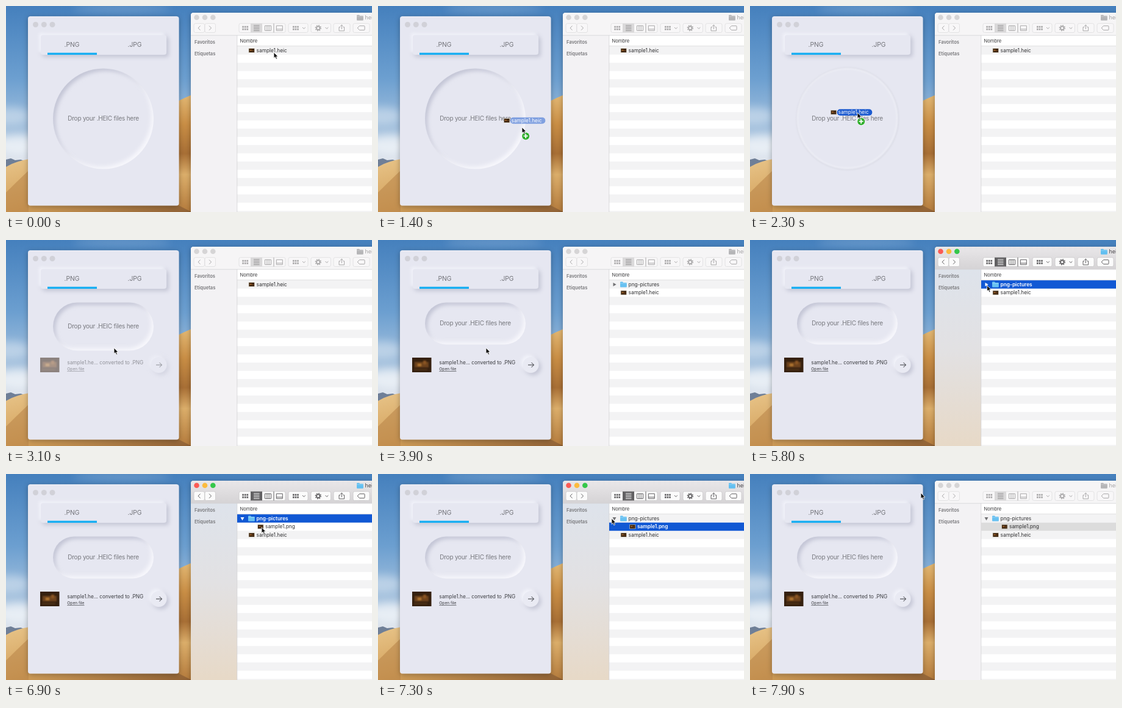
Recreate the animation shown at these times as an HTML page. Size 600 by 338 pixels, loop 8 s.

```html
<!DOCTYPE html>
<html lang="es">
<head>
<meta charset="utf-8">
<title>HEIC converter</title>
<style>
html, body { margin: 0; width: 100%; height: 100%; overflow: hidden; }
svg {
  display: block; width: 100vw; height: 100vh;
  font-family: Inter, "Open Sans", sans-serif;
  --ico: #a9a8a9; --line: #dedddf; --btn: #f8f7f8; --pick: #dad9da; --pickIco: #8f8e8f;
  --red: #d6d5d6; --amber: #d6d5d6; --green: #d6d5d6; --folder: #b5b5b7; --title: #a5a4a5;
  --bar: #f6f5f6; --mark: #dcdcdc;
}
svg.on {
  --ico: #626163; --line: #c9c8ca; --btn: #fbfbfb; --pick: #626163; --pickIco: #fff;
  --red: #fb5b55; --amber: #fcbb3e; --green: #35c74a; --folder: #62bff0; --title: #49484a;
  --bar: url(#barFill); --mark: #1158d4;
}
.ico { fill: none; stroke: var(--ico); stroke-width: 1; }
.ico .solid { fill: var(--ico); stroke: none; }
.btn { fill: var(--btn); stroke: var(--line); stroke-width: .8; }
.row text { fill: #303032; font-size: 8.3px; }
.row .tri { fill: #737375; }
.on .sel text { fill: #fff; font-weight: 600; }
.on .sel .tri { fill: #fff; }
.glass { opacity: 0; }
.on .glass { opacity: 1; }
</style>
</head>
<body>
<svg id="stage" viewBox="0 0 600 338" preserveAspectRatio="none">
  <defs>
    <linearGradient id="sky" x2="0" y2="1">
      <stop offset="0" stop-color="#4580bd"/><stop offset=".35" stop-color="#6c9fd0"/>
      <stop offset=".6" stop-color="#a6c2de"/><stop offset=".76" stop-color="#e3e7ee"/>
    </linearGradient>
    <linearGradient id="sand" x2="0" y2="1">
      <stop offset="0" stop-color="#e3b873"/><stop offset=".25" stop-color="#c98e45"/>
      <stop offset=".5" stop-color="#a86f35"/><stop offset=".68" stop-color="#dcae6a"/>
      <stop offset="1" stop-color="#b47b3c"/>
    </linearGradient>
    <linearGradient id="dune" x2="1" y2="1">
      <stop offset="0" stop-color="#e8c58a"/><stop offset=".5" stop-color="#d3a05a"/>
      <stop offset="1" stop-color="#8f6034"/>
    </linearGradient>
    <linearGradient id="barFill" x2="0" y2="1">
      <stop offset="0" stop-color="#e9e7e9"/><stop offset="1" stop-color="#d5d3d5"/>
    </linearGradient>
    <linearGradient id="glassFill" x2="0" y2="1">
      <stop offset="0" stop-color="#dee3eb"/><stop offset=".45" stop-color="#e2e1e3"/>
      <stop offset="1" stop-color="#e7d9c7"/>
    </linearGradient>
    <filter id="soft" x="-30%" y="-30%" width="160%" height="160%"><feGaussianBlur stdDeviation="3"/></filter>
    <filter id="haze" x="-50%" y="-50%" width="200%" height="200%"><feGaussianBlur stdDeviation="7"/></filter>
    <filter id="fine"><feGaussianBlur stdDeviation="1"/></filter>
    <filter id="raised" x="-50%" y="-50%" width="200%" height="200%">
      <feDropShadow dx="-3.5" dy="-3.5" stdDeviation="2.5" flood-color="#f2f3fa"/>
      <feDropShadow dx="4" dy="4" stdDeviation="3" flood-color="#c6c8d7"/>
    </filter>
    <filter id="window" x="-10%" y="-10%" width="120%" height="120%">
      <feDropShadow dx="0" dy="2" stdDeviation="4" flood-color="#000" flood-opacity=".3"/>
    </filter>
    <clipPath id="wellClip"><rect class="well" data-grow="0"/></clipPath>
  </defs>
  <g id="scene"></g>
</svg>
<script>
const LOOP = 8000, STEP = 100;
const ROW_TOP = 66.2, ROW_H = 13.5;
const $ = id => document.getElementById(id);

const text = (x, y, size, fill, str, more = '') =>
  `<text x="${x}" y="${y}" font-size="${size}" fill="${fill}" ${more}>${str}</text>`;
const box = (x, y, w, h, fill, more = '') =>
  `<rect x="${x}" y="${y}" width="${w}" height="${h}" fill="${fill}" ${more}/>`;
const dot = (x, y, r, fill) => `<circle cx="${x}" cy="${y}" r="${r}" fill="${fill}"/>`;
const path = (d, more = '') => `<path d="${d}" ${more}/>`;
const repeat = (n, fn) => Array.from({ length: n }, (_, i) => fn(i)).join('');
const mid = 'text-anchor="middle"';

const picture = (x, y) => box(x, y, 10, 7.4, '#c9bfae') + box(x + .7, y + .7, 8.6, 6, '#39230f') +
  box(x + 2, y + 2.4, 3, 2, '#a0622a') + box(x + 5.6, y + 3.2, 2.6, 1.6, '#6e421c');
const folder = (x, y, fill) =>
  path(`M${x} ${y + 1}q0-1 1-1h3l1.2 1.3h4.6q1 0 1 1v5.7q0 1-1 1h-8.8q-1 0-1-1z`, `fill="${fill}"`) +
  path(`M${x} ${y + 2.6}h10.8`, 'stroke="#fff" stroke-opacity=".4" stroke-width=".7"');

function desktop() {
  return box(0, 0, 600, 338, 'url(#sky)') +
    `<g filter="url(#haze)" fill="#fff"><ellipse cx="8" cy="180" rx="30" ry="14" opacity=".35"/>
      <ellipse cx="20" cy="228" rx="36" ry="16" opacity=".6"/>
      <ellipse cx="190" cy="4" rx="80" ry="7" opacity=".18"/></g>` +
    path('M0 252l8-2 7 3 9-1 12 4v12H0z', 'fill="#6f7f97"') +
    path('M230 186Q270 160 304 146V338H230z', 'fill="url(#sand)"') +
    path('M0 264Q18 253 46 250Q160 262 304 338H0z', 'fill="url(#dune)"') +
    path('M0 306Q20 286 37 270V338H0z', 'fill="#b98448" opacity=".55"');
}

function converter() {
  const ring = (grow, color, shift) =>
    `<rect class="well" data-grow="${grow}" fill="none" stroke="${color}" stroke-width="20"
      filter="url(#soft)" transform="translate(${shift} ${shift})"/>`;
  return box(36, 17, 247.5, 310.5, '#e6e7f1', 'rx="4" filter="url(#window)"') +
    path('M39 17.4H280', 'stroke="#f5f5fa" stroke-width=".8"') +
    [48.5, 62.3, 76].map(x => dot(x, 30.5, 4.5, '#d1d1d8')).join('') +
    box(57, 47.5, 206, 32.5, '#e6e7f1', 'rx="4" filter="url(#raised)"') +
    text(108, 67, 10.3, '#727379', '.PNG', mid) + text(211, 67, 10.3, '#727379', '.JPG', mid) +
    box(68, 76.7, 81, 3.4, '#17aef2') +
    `<g id="hover"><circle cx="160" cy="185" r="83.5" fill="none" stroke="#dadbe5" stroke-width="2" filter="url(#fine)"/>
      <circle cx="159.4" cy="184.4" r="81.5" fill="none" stroke="#eeeff6" stroke-width="2" filter="url(#fine)"/></g>` +
    `<g id="inset" clip-path="url(#wellClip)">${ring(10, '#c3c5d5', 4)}${ring(10, '#f7f7fc', -4)}</g>` +
    text(159.6, 0, 10, '#77787e', 'Drop your .HEIC files here', `id="hint" ${mid} letter-spacing="-.22"`) +
    `<g id="result">${box(56, 193, 31.5, 24, '#35200f')}
      <g filter="url(#fine)">${box(60, 200, 23, 9, '#6d421a')}${box(65, 203, 6, 4, '#b0752e')}
      ${box(74, 198, 5, 6, '#8a5520')}${box(59, 211, 22, 3, '#4c2e13')}</g>` +
    text(100.3, 203.6, 8.3, '#3c3d42', 'sample1.he... converted to .PNG') +
    text(100.3, 214, 6.6, '#3c3d42', 'Open file', 'text-decoration="underline"') +
    `<circle cx="250.5" cy="205" r="13" fill="#e9eaf3" filter="url(#raised)"/>` +
    path('M246 205h9.5m-4-4l4 4-4 4', 'fill="none" stroke="#333438" stroke-width="1"') + '</g>';
}

function toolbar() {
  const btn = (x, w) => `<rect class="btn" x="${x}" y="28.7" width="${w}" height="14.8" rx="2.5"/>`;
  const chevron = x => path(`M${x} 35l2.4 2.4 2.4-2.4`);
  const cells = (x, y, n, step) => repeat(n * 2, i =>
    `<rect class="solid" x="${x + i % n * step}" y="${y + (i / n | 0) * 4}" width="2.6" height="2.8"/>`);
  return [308, 326].map(x => btn(x, 17.5)).join('') + btn(382, 76) +
    `<rect x="401" y="28.7" width="19" height="14.8" fill="var(--pick)"/>` +
    [[463, 32], [500, 32.5], [537, 27], [569, 27]].map(b => btn(...b)).join('') +
    `<g class="ico">` +
    path('M318.5 32.5l-3.5 3.6 3.5 3.6M333 32.5l3.5 3.6-3.5 3.6') +
    cells(387.3, 32.8, 3, 3.6) +
    path('M406 32h9.5m-9.5 2.8h9.5m-9.5 2.8h9.5m-9.5 2.8h9.5', 'style="stroke:var(--pickIco)"') +
    path('M424.5 32.3h10v8h-10zM427.9 32v8.5M431.2 32v8.5M443.3 32.3h10v8h-10zM443.3 38h10M439 28.7v14.8') +
    cells(470, 32.8, 3, 3.6) + chevron(486) + chevron(523.5) +
    `<circle cx="511.8" cy="36.2" r="2.8" stroke-width="1.8"/>
     <circle cx="511.8" cy="36.2" r="4.5" stroke-width="1.5" stroke-dasharray="1.7 1.83"/>` +
    path('M548 34.6h-2v6.2h8.6v-6.2h-2M550.3 38v-6.8m-2.2 2l2.2-2.2 2.2 2.2') +
    path('M579.5 32.6h7.5q1 0 1 1v5q0 1-1 1h-7.5l-3.3-3.5z') + '</g>';
}

function browser() {
  const rowText = (x, str) => text(x, 9.6, 8.3, '', str);
  return box(303, 11, 310, 340, '#f6f5f6', 'rx="4.5" filter="url(#window)"') +
    path('M303 48V15.5q0-4.5 4.5-4.5H600V48z', 'style="fill:var(--bar)"') +
    box(303, 48, 76, 290, '#f3f2f4') + box(303, 48, 76, 290, 'url(#glassFill)', 'class="glass"') +
    [312.5, 326, 339.3].map((x, i) => dot(x, 18.8, 4.3, `var(--${['red', 'amber', 'green'][i]})`)).join('') +
    folder(575, 14.8, 'var(--folder)') + text(588.5, 22.3, 9, 'var(--title)', 'heic') +
    toolbar() +
    text(309, 62.3, 7.6, '#77777a', 'Favoritos', 'font-weight="600"') +
    text(309, 81.3, 7.6, '#77777a', 'Etiquetas', 'font-weight="600"') +
    box(379, 48, 221, 290, '#fff') +
    repeat(11, i => box(379, ROW_TOP + i * 2 * ROW_H, 221, ROW_H, '#f3f3f4')) +
    text(383.5, 59.8, 7.6, '#3b3b3d', 'Nombre') +
    path('M303 48.2H600M379 65.7H600M378.8 48V338', 'stroke="#d5d4d6" stroke-width=".8"') +
    box(379, 0, 221, ROW_H, 'var(--mark)', 'id="mark"') +
    `<g id="dirRow" class="row"><g id="tri">${path('M-2-3L3.2 0L-2 3z', 'class="tri"')}</g>
      ${folder(397, 2.4, '#68c1f1')}${rowText(410.6, 'png-pictures')}</g>
    <g id="pngRow" class="row">${picture(412.3, 3.1)}${rowText(425, 'sample1.png')}</g>
    <g id="heicRow" class="row">${picture(397.7, 3.1)}${rowText(410.6, 'sample1.heic')}</g>`;
}

function pointer() {
  return `<g id="drag">${picture(-12.4, -3.7)}
      <rect id="pill" x="-1.7" y="-5.2" width="57.5" height="10.4" rx="5" fill="#1c5bd0"/>
      ${text(0, 2.9, 8.3, '#fff', 'sample1.heic')}</g>
    <g id="cursor"><g id="plus">${dot(6.2, 14.4, 6.6, '#fff')}${dot(6.2, 14.4, 6, '#2fae2c')}
      ${path('M6.2 10.9v7M2.7 14.4h7', 'stroke="#fff" stroke-width="1.8"')}</g>
      ${path('M0 0V9.6L2.2 7.6L3.8 11.2L5.5 10.4L4 7H7z',
        'fill="#111" stroke="#fff" stroke-width=".8" stroke-linejoin="round"')}</g>`;
}

$('scene').innerHTML = desktop() + converter() + browser() + pointer();
const wells = document.querySelectorAll('.well');

const clamp = v => Math.min(1, Math.max(0, v));
const smooth = v => v * v * (3 - 2 * v);
const ramp = (t, from, to) => smooth(clamp((t - from) / (to - from)));
const mix = (a, b, k) => a + (b - a) * k;

// time, x, y, eased arrival
const TRACK = [
  [0, 439, 76], [400, 439, 76], [1300, 250, 188.5, true], [1400, 236, 199], [1500, 227, 202],
  [2200, 176, 175, true], [2300, 176, 175], [2500, 177, 177], [4400, 177, 177],
  [5400, 388.5, 74.5, true], [6200, 388.5, 74.5], [6700, 419, 87.5, true], [7100, 419, 87.5],
  [7700, 280, 31, true], [LOOP, 280, 31]
];
function cursorAt(t) {
  const i = Math.max(1, TRACK.findIndex(k => k[0] >= t));
  const [a, b] = [TRACK[i - 1], TRACK[i]];
  const lin = clamp((t - a[0]) / (b[0] - a[0]));
  const k = b[3] ? smooth(lin) : lin;
  return [mix(a[1], b[1], k), mix(a[2], b[2], k)];
}

const show = (id, on) => { $(id).style.display = on ? '' : 'none'; };
const move = (id, x, y, more = '') => $(id).setAttribute('transform', `translate(${x} ${y})${more}`);
const fade = (id, v) => { $(id).style.opacity = v; };
const rowY = i => ROW_TOP + i * ROW_H;

function sizeWell(height) {
  for (const el of wells) {
    const g = +el.dataset.grow;
    const attrs = { x: 77 - g, y: 102.5 - g, width: 165 + 2 * g, height: height + 2 * g, rx: height / 2 + g };
    for (const name in attrs) el.setAttribute(name, attrs[name]);
  }
}

function draw(t) {
  const shrink = ramp(t, 2700, 3200);
  const height = mix(165, 69, shrink);
  const hover = ramp(t, 1400, 1900) * (1 - ramp(t, 2500, 2800));
  sizeWell(height);
  fade('inset', 1 - hover);
  fade('hover', hover);
  $('hint').setAttribute('y', 102.5 + height / 2 + 3.4);
  fade('result', ramp(t, 2900, 3300));

  const active = t >= 5600 && t < 7700;
  const listed = t >= 3300, open = t >= 6100, pngPicked = t >= 7000;
  $('stage').classList.toggle('on', active);
  show('dirRow', listed);
  show('pngRow', open);
  show('mark', t >= 5600);
  $('mark').setAttribute('y', rowY(pngPicked ? 1 : 0));
  $('dirRow').classList.toggle('sel', !pngPicked);
  $('pngRow').classList.toggle('sel', pngPicked);
  move('dirRow', 0, rowY(0));
  move('pngRow', 0, rowY(1));
  move('heicRow', 0, rowY(listed + open));
  move('tri', 387.5, 6.8, open ? ' rotate(90)' : '');

  const [x, y] = cursorAt(t);
  const [lagX, lagY] = cursorAt(Math.max(0, t - 100));
  move('cursor', x, y);
  move('drag', lagX - 31.5, lagY - .5);
  show('drag', t >= 400 && t < 2500);
  show('plus', t >= 400 && t < 2500 && x < 283);
  fade('pill', mix(.5, 1, ramp(t, 1500, 1800)));
}

const start = performance.now();
function tick() {
  const t = (performance.now() - start) % LOOP;
  draw(Math.floor(t / STEP) * STEP);
  requestAnimationFrame(tick);
}
tick();
</script>
</body>
</html>
```
